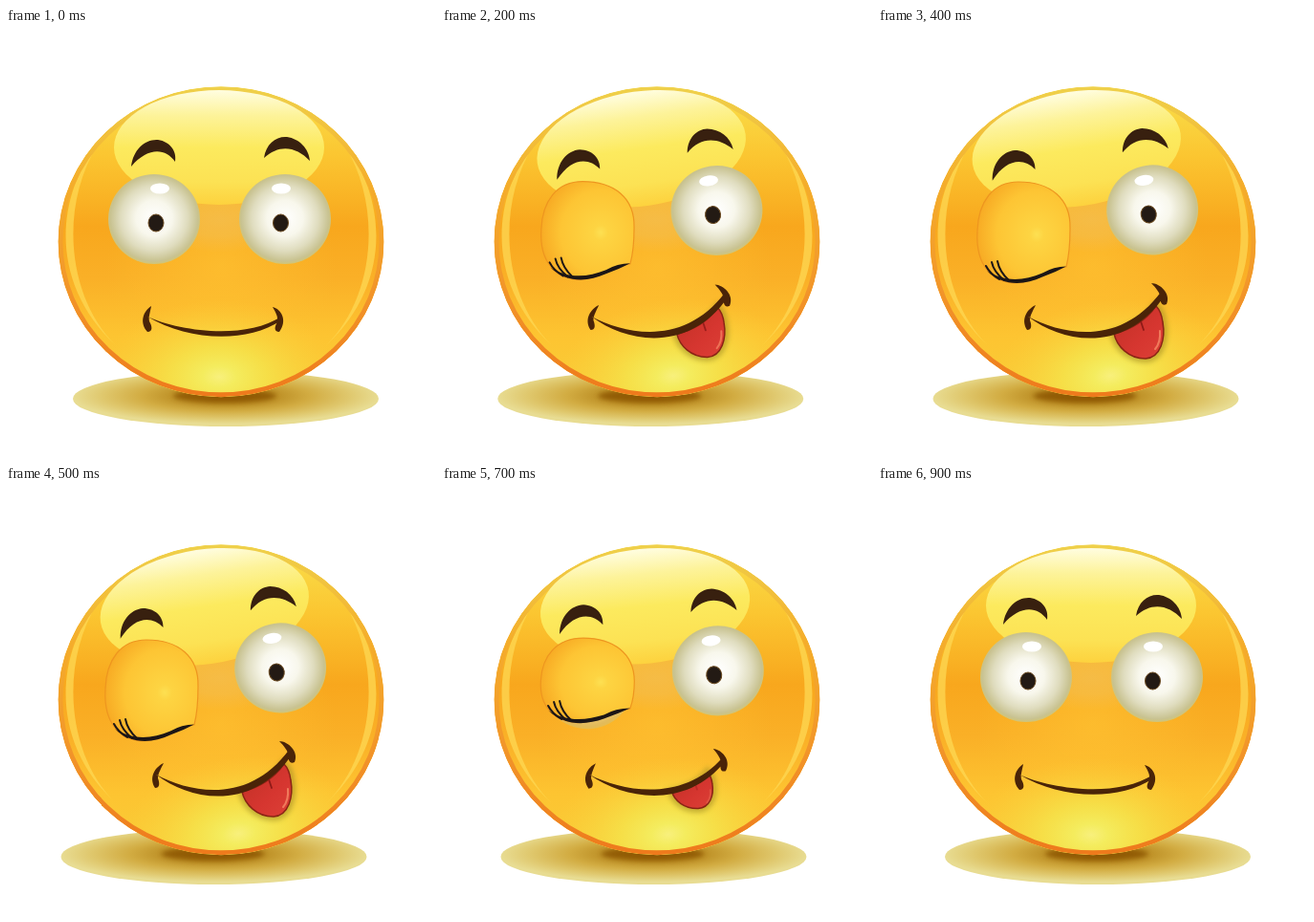
Write an HTML page that moves like this. It is 450 px wide and 450 px high and loops after 2.4 s.

```html
<!DOCTYPE html>
<html lang="en">
<head>
<meta charset="utf-8">
<title>Winking face</title>
<style>
  html, body { margin: 0; width: 100%; height: 100%; overflow: hidden; background: #fff; }
  svg { display: block; width: 100vw; height: 100vh; }
</style>
</head>
<body>
<svg viewBox="0 0 450 450">
  <defs>
    <linearGradient id="skin" x1="0" y1="0" x2="0" y2="1">
      <stop offset="0" stop-color="#f9e04c"/>
      <stop offset=".22" stop-color="#fbc631"/>
      <stop offset=".45" stop-color="#f8a71d"/>
      <stop offset=".62" stop-color="#fab027"/>
      <stop offset=".8" stop-color="#fdc431"/>
      <stop offset="1" stop-color="#f8cd38"/>
    </linearGradient>
    <radialGradient id="center">
      <stop offset="0" stop-color="#ffc533" stop-opacity=".6"/>
      <stop offset="1" stop-color="#ffc533" stop-opacity="0"/>
    </radialGradient>
    <radialGradient id="nose">
      <stop offset="0" stop-color="#f4bf50" stop-opacity=".75"/>
      <stop offset=".5" stop-color="#f4bf50" stop-opacity=".55"/>
      <stop offset="1" stop-color="#f4bf50" stop-opacity="0"/>
    </radialGradient>
    <radialGradient id="glow">
      <stop offset="0" stop-color="#f8f07c"/>
      <stop offset=".14" stop-color="#f4ec5e"/>
      <stop offset=".4" stop-color="#f5e44c" stop-opacity=".8"/>
      <stop offset="1" stop-color="#fbd03a" stop-opacity="0"/>
    </radialGradient>
    <linearGradient id="rim" x1="0" y1="0" x2="0" y2="1">
      <stop offset="0" stop-color="#efd04a"/>
      <stop offset=".3" stop-color="#f4ae2c"/>
      <stop offset=".65" stop-color="#f2962a"/>
      <stop offset="1" stop-color="#ee7a1c"/>
    </linearGradient>
    <linearGradient id="shine" x1="0" y1="0" x2="0" y2="1">
      <stop offset="0" stop-color="#fffde0"/>
      <stop offset=".22" stop-color="#fdf39a"/>
      <stop offset=".5" stop-color="#fcea5e"/>
      <stop offset=".8" stop-color="#fce254"/>
      <stop offset="1" stop-color="#fdd23e"/>
    </linearGradient>
    <radialGradient id="ground" cy=".45">
      <stop offset="0" stop-color="#9a680c"/>
      <stop offset=".28" stop-color="#b98a20"/>
      <stop offset=".55" stop-color="#d2ac42"/>
      <stop offset=".8" stop-color="#dfc76c"/>
      <stop offset="1" stop-color="#e8dc92"/>
    </radialGradient>
    <radialGradient id="ball" cx=".5" cy=".49" r=".52">
      <stop offset="0" stop-color="#fff"/>
      <stop offset=".38" stop-color="#f8f7ec"/>
      <stop offset=".7" stop-color="#dfdcbe"/>
      <stop offset=".92" stop-color="#c8c290"/>
      <stop offset="1" stop-color="#d4c66e"/>
    </radialGradient>
    <radialGradient id="lidFill" cx=".64" cy=".52" r=".66">
      <stop offset="0" stop-color="#fde052"/>
      <stop offset=".12" stop-color="#fdd442"/>
      <stop offset=".65" stop-color="#fdc534"/>
      <stop offset="1" stop-color="#f7a923"/>
    </radialGradient>
    <linearGradient id="tongueFill" x1="0" y1="0" x2="1" y2="1">
      <stop offset="0" stop-color="#bf3025"/>
      <stop offset=".6" stop-color="#d63630"/>
      <stop offset="1" stop-color="#dc4036"/>
    </linearGradient>
    <filter id="soft" x="-50%" y="-50%" width="200%" height="200%"><feGaussianBlur stdDeviation="2.5"/></filter>
    <ellipse id="eyeShape" rx="48" ry="47" fill="url(#ball)"/>
    <path id="crescent" d="M96 122C50 180 47 270 115 332C66 285 54 190 96 122Z" fill="#fed853" opacity=".75"/>
    <clipPath id="disc"><ellipse cx="225" cy="223.7" rx="170.5" ry="162.5"/></clipPath>
  </defs>

  <g id="shadow">
    <ellipse cx="230" cy="388" rx="160" ry="29" fill="url(#ground)"/>
    <ellipse cx="229" cy="385" rx="54" ry="7" fill="#8a5206" opacity=".8" filter="url(#soft)"/>
  </g>

  <g clip-path="url(#disc)">
    <ellipse cx="225" cy="223.7" rx="170.5" ry="162.5" fill="url(#skin)"/>
    <ellipse cx="225" cy="250" rx="120" ry="110" fill="url(#center)"/>
    <ellipse cx="224" cy="201" rx="75" ry="34" fill="url(#nose)"/>
    <ellipse class="tilt" cx="223" cy="365" rx="125" ry="80" fill="url(#glow)"/>
    <use href="#crescent"/>
    <use href="#crescent" transform="matrix(-1 0 0 1 450 0)"/>
    <ellipse cx="225" cy="223.7" rx="168" ry="160" fill="none" stroke="url(#rim)" stroke-width="5"/>
  </g>

  <g class="tilt">
    <ellipse cx="223" cy="125" rx="110" ry="60" fill="url(#shine)"/>
    <g fill="#38200f">
      <path d="M131 145C133 127 146 116 159 117C172 119 179 129 177 140C167 126 149 124 131 145Z"/>
      <path d="M270 136C272 121 283 113 294 114C307 116 317 126 318 139C304 124 286 121 270 136Z"/>
    </g>
    <g id="leftEye">
      <use href="#eyeShape" x="155" y="200"/>
      <ellipse cx="161" cy="168" rx="10" ry="5.5" fill="#fff"/>
      <ellipse cx="157" cy="204" rx="8" ry="9" fill="#231a14" stroke="#6b4a20"/>
    </g>
    <use href="#eyeShape" x="292" y="200"/>
    <ellipse cx="288" cy="168" rx="10" ry="5.5" fill="#fff"/>
    <ellipse cx="287.5" cy="204" rx="8" ry="9" fill="#231a14" stroke="#6b4a20"/>
  </g>

  <g id="lid">
    <path id="lidSkin" fill="url(#lidFill)" stroke="#ee961f" stroke-width="1.2"/>
    <path id="lash" fill="#1c1616"/>
    <path id="hairs" d="M113 249Q117 257 127 263M119 245Q121 255 132 264M125 244Q127 255 137 264"
          fill="none" stroke="#1c1616" stroke-width="2" stroke-linecap="round"/>
  </g>

  <g id="tongue">
    <path class="tongueShape" fill="none" stroke="#a08c20" stroke-width="9" opacity=".55" filter="url(#soft)"/>
    <path class="tongueShape" fill="url(#tongueFill)" stroke="#8a2414" stroke-width="1.5"/>
    <path id="crease" fill="none" stroke="#8f1a18" stroke-width="1.8" stroke-linecap="round"/>
    <path id="gloss" fill="none" stroke="#f07a5c" stroke-width="2" stroke-linecap="round"/>
  </g>
  <path id="mouth" fill="#4a2408"/>
</svg>

<script>
const $ = id => document.getElementById(id);
const all = selector => document.querySelectorAll(selector);
const NUM = /-?\d+(\.\d+)?/g;

// Each part: path at rest, path in the full wink.
const shapes = {
  lidSkin: [
    'M108 194C104 192 102 190 102 186C104 168 120 155 150 155C178 156 199 168 202 192C202 194 200 196 196 197C178 197 164 206 142 206C126 205 114 200 108 194Z',
    'M115 254C106 244 103 228 104 212C105 182 120 161 147 161C180 161 202 178 201 210C201 225 200 238 197 250C178 252 164 267 142 267C130 266 120 261 115 254Z'],
  mouth: [
    'M148 302C180 317 250 327 288 302L288 306C250 331 190 327 148 302Z' +
    'M152 291C144 296 139 308 148 318C154 318 153 312 150 307C149 302 151 297 152 291Z' +
    'M279 292C288 294 295 306 286 318C280 318 281 312 284 308C285 302 282 297 279 292Z',
    'M157 302C195 322 255 333 297 275L300 280C260 340 195 331 157 302Z' +
    'M165 290C156 294 149 305 156 316C161 316 161 311 159 306C159 301 162 296 165 290Z' +
    'M286 267C295 267 307 278 302 289C297 292 295 286 296 283C295 277 291 272 286 267Z'],
  tongue: [
    'M227 321C229 321 234 320 242 319C247 319 250 319 250 319C250 319 250 319 250 319Q243 322 227 321Z',
    'M247 320C250 333 262 346 280 346C296 345 301 325 298 308C297 300 294 294 291 291Q275 313 247 320Z'],
  crease: ['M243 321L243 321', 'M274 304L278 316'],
  gloss: ['M250 321Q251 321 250 321', 'M295 317Q296 329 290 336']
};

const mix = (a, b, p) => a + (b - a) * p;
const clamp = v => Math.min(1, Math.max(0, v));
const smooth = v => { v = clamp(v); return v * v * (3 - 2 * v); };

function morph(name, p) {
  const [rest, wink] = shapes[name];
  const goal = wink.match(NUM);
  let i = 0;
  return rest.replace(NUM, n => mix(+n, +goal[i++], p).toFixed(2));
}

function lashPath(p) {
  const x = mix(106, 114, p), left = mix(194, 254, p);
  const low = mix(205, 266, p), right = mix(196, 249.5, p);
  return `M${x} ${left}C${x + 18} ${low} ${x + 38} ${low - 1} ${x + 58} ${right + 7}Q${x + 70} ${right} 197 ${right}` +
         `Q${x + 72} ${right + 6} ${x + 58} ${right + 11}C${x + 38} ${low + 4} ${x + 16} ${low + 4} ${x} ${left}Z`;
}

function draw(t) {
  const p = t < 550 ? smooth(t / 235) : smooth((900 - t) / 320);

  $('shadow').setAttribute('transform', `translate(${-12.5 * p} 0)`);
  for (const el of all('.tilt')) el.setAttribute('transform', `rotate(${-8.5 * p} 225 228)`);
  $('leftEye').setAttribute('opacity', clamp(1 - 1.1 * p * p));

  $('lid').setAttribute('opacity', clamp(p * 1.5));
  $('lidSkin').setAttribute('d', morph('lidSkin', p));
  $('lash').setAttribute('d', lashPath(p));
  $('hairs').setAttribute('transform', `translate(${6 * (p - 1)} ${60 * (p - 1)})`);

  $('tongue').setAttribute('opacity', clamp(p * 2.2));
  for (const el of all('.tongueShape')) el.setAttribute('d', morph('tongue', p));
  for (const id of ['crease', 'gloss']) {
    $(id).setAttribute('d', morph(id, p));
    $(id).setAttribute('opacity', clamp(p * 2 - 1));
  }
  $('mouth').setAttribute('d', morph('mouth', p));
}

const start = performance.now();
function tick() {
  const t = (performance.now() - start) % 2400;
  draw(Math.floor(t / 50) * 50);
  requestAnimationFrame(tick);
}
tick();
</script>
</body>
</html>
```
